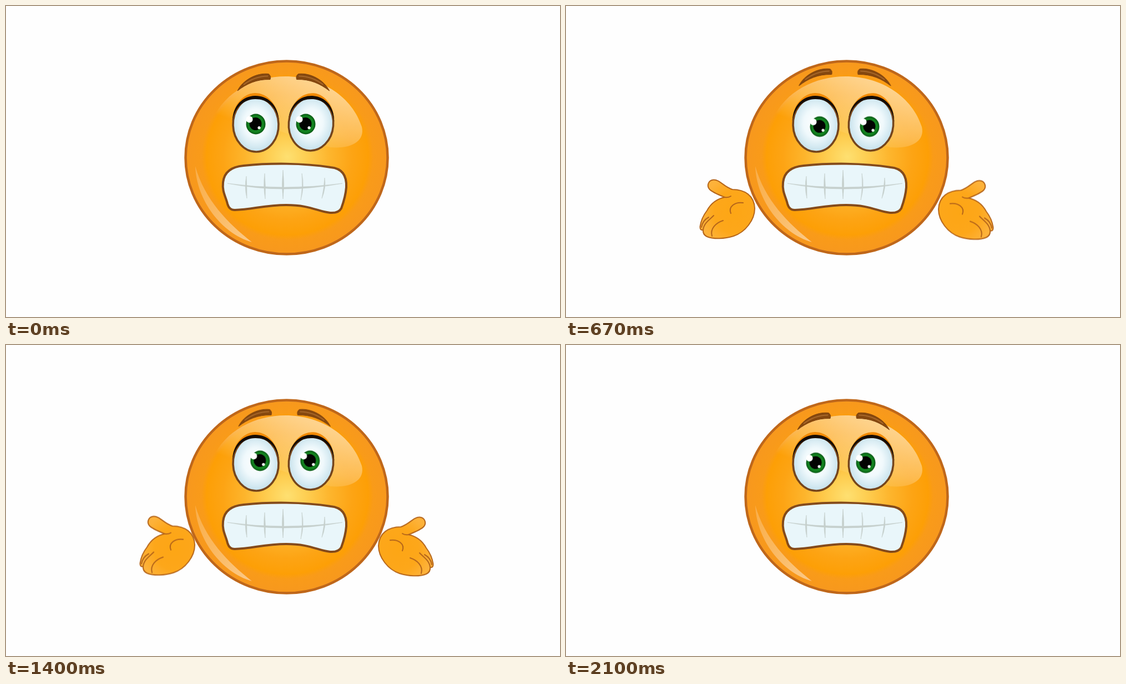
Recreate the animation shown at these times as an HTML page. Size 998 by 561 pixels, loop 2130 ms.

```html
<!DOCTYPE html>
<html lang="en">
<head>
<meta charset="utf-8">
<title>Nervous shrug</title>
<style>
  html, body { margin: 0; width: 100%; height: 100%; overflow: hidden; background: #fefefe; }
  svg { display: block; width: 100vw; height: 100vh; }
  .hand, .brows, .orbit, .gaze { animation: 2130ms linear infinite; }

  /* The gaze circles once per loop; the inner turn keeps the glints upright. */
  .orbit, .gaze { animation-name: turn; }
  .gaze { animation-direction: reverse; }
  @keyframes turn {
    from { transform: rotate(0deg); }
    to { transform: rotate(-360deg); }
  }

  .brows { animation-name: raise; }
  @keyframes raise {
    0%, 16.5% { transform: translate(0, 0); animation-timing-function: ease-in-out; }
    25%, 51% { transform: translate(2.5px, -9px); }
    59.6% { transform: translate(2.5px, -8px); }
    73.7% { transform: translate(1px, -4px); }
    82%, 100% { transform: translate(0, 0); }
  }

  .hand { animation-name: shrug; }
  @keyframes shrug {
    0%, 18% { transform: translate(110px, -75px); animation-timing-function: ease-out; }
    24.9% { transform: translate(4px, -13px); animation-timing-function: ease-out; }
    29%, 49% { transform: translate(0, 0); }
    59.6% { transform: translate(0, -4px); }
    74.5% { transform: translate(0, -5px); animation-timing-function: ease-in; }
    84%, 100% { transform: translate(110px, -75px); }
  }
</style>
</head>
<body>
<svg viewBox="0 0 998 561" preserveAspectRatio="none">
  <defs>
    <filter id="soft" filterUnits="userSpaceOnUse" x="0" y="0" width="998" height="561" color-interpolation-filters="sRGB">
      <feGaussianBlur stdDeviation=".7"/>
    </filter>
    <radialGradient id="skin" gradientUnits="userSpaceOnUse" cx="0" cy="0" r="182"
        gradientTransform="translate(507 272) scale(1 .97)">
      <stop offset="0" stop-color="#fee071"/>
      <stop offset=".18" stop-color="#fecf53"/>
      <stop offset=".42" stop-color="#fdb52d"/>
      <stop offset=".64" stop-color="#fda414"/>
      <stop offset=".8" stop-color="#fd9f06"/>
      <stop offset=".85" stop-color="#f99b19"/>
      <stop offset="1" stop-color="#f7981e"/>
    </radialGradient>
    <linearGradient id="shine" gradientUnits="userSpaceOnUse" x1="520" y1="127" x2="470" y2="260">
      <stop offset="0" stop-color="#fff" stop-opacity=".54"/>
      <stop offset=".5" stop-color="#fff" stop-opacity=".25"/>
      <stop offset=".8" stop-color="#fff" stop-opacity="0"/>
    </linearGradient>
    <linearGradient id="rim" x1="0" y1="0" x2=".8" y2="1">
      <stop offset="0" stop-color="#fff" stop-opacity=".2"/>
      <stop offset=".5" stop-color="#fff" stop-opacity=".3"/>
      <stop offset="1" stop-color="#fff" stop-opacity=".45"/>
    </linearGradient>
    <radialGradient id="ball" cx=".5" cy=".48" r=".53">
      <stop offset="0" stop-color="#fff"/>
      <stop offset=".5" stop-color="#f0f9fc"/>
      <stop offset="1" stop-color="#c3e0eb"/>
    </radialGradient>
    <radialGradient id="iris">
      <stop offset=".55" stop-color="#158a22"/>
      <stop offset=".8" stop-color="#12801f"/>
      <stop offset="1" stop-color="#075312"/>
    </radialGradient>
    <radialGradient id="palm" cx=".62" cy=".55" r=".6">
      <stop offset="0" stop-color="#fda615"/>
      <stop offset=".6" stop-color="#fda71a"/>
      <stop offset="1" stop-color="#fdb23a"/>
    </radialGradient>

    <g id="eye">
      <ellipse cy="-4" rx="42" ry="53" fill="#f28a05"/>
      <ellipse rx="41" ry="49" fill="url(#ball)" stroke="#75451c" stroke-width="3.6"/>
      <path d="M-42-8C-40-37-21-52 0-52S40-37 42-8C37-33 20-46 0-46S-37-33-42-8Z" fill="#160c04"/>
    </g>

    <g id="pupil">
      <ellipse rx="17.5" ry="18.5" fill="url(#iris)"/>
      <ellipse cx="-.5" cy="-.5" rx="11" ry="11.5" fill="#020402"/>
      <circle cx="-11.5" cy="-8.5" r="6" fill="#fff"/>
      <circle cx="6" cy="6.5" r="2.6" fill="#fff"/>
    </g>

    <g id="brow">
      <path d="M417 153C426 134 451 120 473 122.500Q478 126 476 132.500C451 132 434 140 417 153Z"
        fill="#85480f" stroke="#7d410d"/>
      <path d="M428 142C441 132 456 126.500 472 126.500" fill="none" stroke="#a8682b" stroke-width="2"/>
    </g>

    <g id="hand" stroke="#b5651a" stroke-width="2" stroke-linecap="round" stroke-linejoin="round">
      <path d="M286 345C276 341 263 336 258 330C253 323 257 314 266 313.500C277 313 284 326 300 331
        C322 331 339 342 340 365C340 386 323 408 302 415C286 420 266 421 254 416
        Q246 412 247 404Q241 405 241.500 398C243 387 247 378 254 369C260 358 271 348 286 345Z" fill="url(#palm)"/>
      <path d="M286 345Q293 346 297 343M297 374C292 362 304 353 319 355
        M266 378C258 386 248 392 247 404M283 387C270 391 259 402 263 415M257 381Q246 387 244 399" fill="none"/>
    </g>
  </defs>

  <g filter="url(#soft)">
    <g class="hand"><use href="#hand"/></g>
    <g transform="translate(1011 1.500) scale(-1 1)"><g class="hand"><use href="#hand"/></g></g>

    <ellipse cx="505.500" cy="273.500" rx="182" ry="174" fill="url(#skin)" stroke="#bf671a" stroke-width="4.500"/>
    <path d="M372 205C395 153 450 127 503 127C570 127 624 165 641 218C647 244 622 258 585 255
      C520 240 450 200 372 205Z" fill="url(#shine)"/>
    <path d="M341 289C343 350 388 410 443 426C400 392 358 350 341 289Z" fill="url(#rim)"/>

    <g class="brows">
      <use href="#brow"/>
      <use href="#brow" transform="translate(999.500 0) scale(-1 1)"/>
    </g>

    <use href="#eye" transform="translate(450 214) rotate(-2)"/>
    <use href="#eye" transform="translate(549.500 213) rotate(5) scale(.98)"/>
    <g transform="translate(455 213)"><g class="orbit"><g transform="translate(-5 0)">
      <g class="gaze"><use href="#pupil"/></g>
    </g></g></g>
    <g transform="translate(545 213)"><g class="orbit"><g transform="translate(-5 0)">
      <g class="gaze"><use href="#pupil"/></g>
    </g></g></g>

    <path d="M391 318C393 300 405 290 428 288C475 283 535 283 585 291C606 293 614 306 613 327
      C612 341 608 354 604 365Q599 374 584 373C562 371 548 359 505 359C465 359 445 367 412 368
      Q402 368 399 357C396 344 389 335 391 318Z" fill="#e9f6fa" stroke="#844a1a" stroke-width="4"/>
    <g fill="#c5cfcc" stroke="#c5cfcc" stroke-width=".6">
      <path d="M399 320Q500 334 606 320Q500 340 399 320Z"/>
      <path d="M433 307Q429 327 434 347Q434 327 433 307Z"/>
      <path d="M466 302Q463 325 467 348Q468 325 466 302Z"/>
      <path d="M499 296Q496 322 499 348Q502 322 499 296Z"/>
      <path d="M533 302Q535 325 531 350Q538 325 533 302Z"/>
      <path d="M574 310Q573 328 569 347Q577 328 574 310Z"/>
    </g>
  </g>
</svg>
</body>
</html>
```
